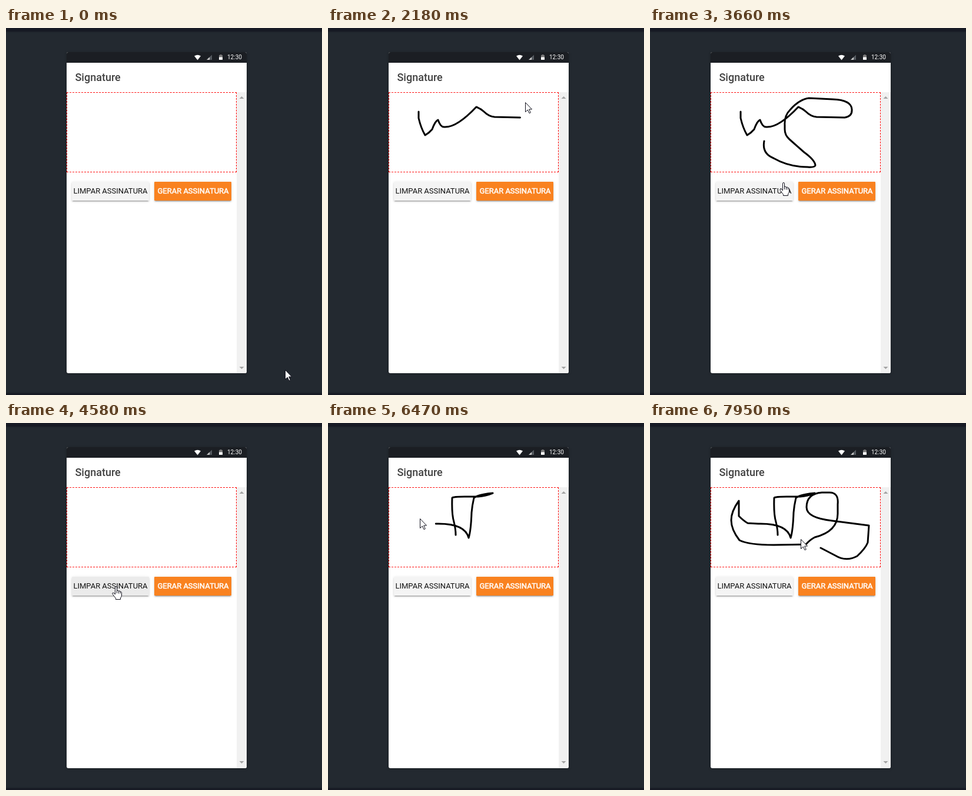
An HTML page for the animation above (8000 ms loop, 537 by 623 pixels).

```html
<!DOCTYPE html>
<html lang="pt">
<head>
<meta charset="utf-8">
<title>Signature pad</title>
<style>
  html, body { margin: 0; width: 100%; height: 100%; overflow: hidden; background: #232930; }
  body { position: relative; font-family: Roboto, sans-serif; }
  div, svg { position: absolute; box-sizing: border-box; }
  .edge { left: 0; width: 537px; background: #171a24; box-shadow: 0 0 3px #171a24; }
  #phone { left: 103px; top: 41px; width: 306px; height: 545px; background: #fff; border-radius: 3px;
    overflow: hidden; box-shadow: 0 1px 5px rgba(0, 0, 0, .25); }
  #status { width: 306px; height: 18px; background: #1b1e23; }
  #clock { left: 273px; top: 3px; font-size: 10px; line-height: 12px; color: #fff; }
  #title { left: 14.5px; top: 31px; font: 500 18px/24px Roboto, sans-serif; color: #424242; }
  #pad { top: 68px; width: 289px; height: 136px; border: 1px dashed #f00; }
  #bar { left: 289px; top: 68px; width: 17px; height: 477px; background: #f1f1f1; }
  .button { top: 220px; width: 131px; height: 32px; border-radius: 1px; font-size: 13px; line-height: 31px;
    text-align: center; white-space: nowrap;
    box-shadow: 0 2px 2px rgba(0, 0, 0, .14), 0 3px 1px -2px rgba(0, 0, 0, .2), 0 1px 5px rgba(0, 0, 0, .12); }
  #clear { left: 9px; background: #f4f4f4; color: #111; }
  #make { left: 149px; background: #f98220; color: #fff; text-indent: 1px; -webkit-text-stroke: .5px #fff; }
  .ink { fill: none; stroke: #000; stroke-width: 3; stroke-linecap: round; stroke-linejoin: round; }
  .pointer { fill: #fff; stroke: #10101c; }
</style>
</head>
<body>
<div class="edge" style="top:0;height:6px"></div>
<div class="edge" style="top:620px;height:3px"></div>
<div id="phone">
  <div id="status"></div>
  <div id="title">Signature</div>
  <div id="pad"></div>
  <div id="bar"></div>
  <div class="button" id="clear">LIMPAR ASSINATURA</div>
  <div class="button" id="make">GERAR ASSINATURA</div>
  <div id="clock">12:30</div>
  <svg width="306" height="545">
    <path fill="#fff" d="M217 6.5Q222.500 3 228 6.5L222.500 13.5Z"/>
    <path fill="#555a60" d="M247 4.5V13H238Z"/>
    <path fill="#ccc" d="M243 8.5V13H238Z"/>
    <path fill="#777" d="M259 5H260.500V4H263.500V5H265V9H259Z"/>
    <path fill="#fff" d="M259 8.5H265V13H259Z"/>
    <path fill="#a3a3a3" d="M293.500 79L297.500 75L301.500 79Z"/>
    <path id="down" fill="#a3a3a3" d="M293.500 534L297.500 538L301.500 534Z"/>
  </svg>
</div>
<svg width="537" height="623">
  <path class="ink" id="first" pathLength="1" d="M154 142V153Q158 170 165 182Q172 178 177 172Q182 158 187 156
    Q191 168 197 168Q218 170 252 134Q260 137 265 142Q273 150 283 151L331 152Q344 150 343 138Q342 122 310 121
    L270 119Q254 121 238 139Q228 149 229 165V172Q229 182 237 189L262 211Q280 224 281 233Q280 237 268 236
    Q236 236 210 221Q190 213 194 192"/>
  <path class="ink" id="second" pathLength="1" d="M217 190Q217 180 214 168Q210 155 211 127Q213 125 232 125H255
    Q268 124 280 119Q256 121 248 127Q245 140 244 152Q243 182 239 195Q233 170 184 171L166 170Q159 166 151 158V132
    Q138 150 138 165Q138 181 152 199Q168 207 210 207L265 206Q272 198 280 194Q319 184 319 154V138Q321 118 305 118
    H292Q266 120 266 143Q266 161 310 166L372 174Q371 190 370 203Q366 213 352 226Q333 236 315 225L290 212"/>
  <path class="pointer" id="arrow" d="M.5 .5V16.5L4.3 13L7 18.7L9.3 17.7L6.7 12H11.5Z"/>
  <path class="pointer" id="hand" d="M-.5 14V2.2Q-.5 .5 1 .5T2.5 2.2V8Q2.700 6.800 4 7T5.500 9Q5.700 7.800 7 8
    T8.300 10Q8.500 9 9.500 9.300T10.500 11.5V16Q10 18.5 8.500 20V22.5H.5V20.5Q-2 17.5 -4.800 13.5Q-6 11.6 -4.200 11.2
    Q-2.500 11 -.5 14ZM2.500 8V12M5.500 9V12.5M8.300 10V12.5"/>
</svg>
<script>
const LOOP = 8000, STEP = 75, PHASE = 55, CLEARED = 4555;
const $ = id => document.getElementById(id);

const strokes = [
  { path: $('first'), from: 1360, to: 2680, until: CLEARED, power: 1.55 },
  { path: $('second'), from: 5450, to: 7850, until: LOOP, power: 1.2 }
];

// Pointer stops between the strokes: time, x, y
const stops = [[0, 474, 580], [180, 394, 235], [400, 402, 225], [1110, 179, 162], [1360, 154, 142],
  [2680, 194, 192], [2750, 196, 184], [2950, 196, 184], [3330, 270, 200], [3800, 207, 289],
  [4120, 186, 277], [4600, 186, 277], [5450, 217, 190], [7850, 290, 212], [7930, 256, 197]];

// Drawn share of a stroke: the hand speeds up a little on the way
function progress({ from, to, power }, t) {
  return Math.min(1, Math.max(0, (t - from) / (to - from))) ** power;
}

function pointerAt(t) {
  const s = strokes.find(s => t >= s.from && t <= s.to);
  if (s) {
    const { x, y } = s.path.getPointAtLength(progress(s, t) * s.path.getTotalLength());
    return [x, y];
  }
  const i = stops.findIndex(k => k[0] > t);
  if (i < 0) return stops[stops.length - 1].slice(1);
  const [t0, x0, y0] = stops[i - 1], [t1, x1, y1] = stops[i];
  const f = (t - t0) / (t1 - t0);
  return [x0 + (x1 - x0) * f, y0 + (y1 - y0) * f];
}

function show(element, visible) {
  element.style.display = visible ? '' : 'none';
}

function frame(now) {
  // The screen updates in steps, and ink trails the pointer by one step
  const t = Math.max(0, Math.floor((now % LOOP - PHASE) / STEP) * STEP + PHASE);
  for (const s of strokes) {
    const drawn = progress(s, t - STEP);
    show(s.path, drawn > 0 && t < s.until);
    s.path.setAttribute('stroke-dasharray', `${drawn} 2`);
  }

  const [x, y] = pointerAt(t).map(Math.round);
  const onButton = y >= 261 && y < 294 && x >= 112 && x < 243;
  for (const id of ['arrow', 'hand']) {
    show($(id), (id === 'hand') === onButton);
    $(id).setAttribute('transform', `translate(${x} ${y})`);
  }

  $('clear').style.background = t >= CLEARED && t < 4800 ? '#ebebeb' : '#f4f4f4';
  $('down').setAttribute('transform', `translate(0 ${t < CLEARED ? 0 : -1})`);
  requestAnimationFrame(frame);
}
requestAnimationFrame(frame);
</script>
</body>
</html>
```
